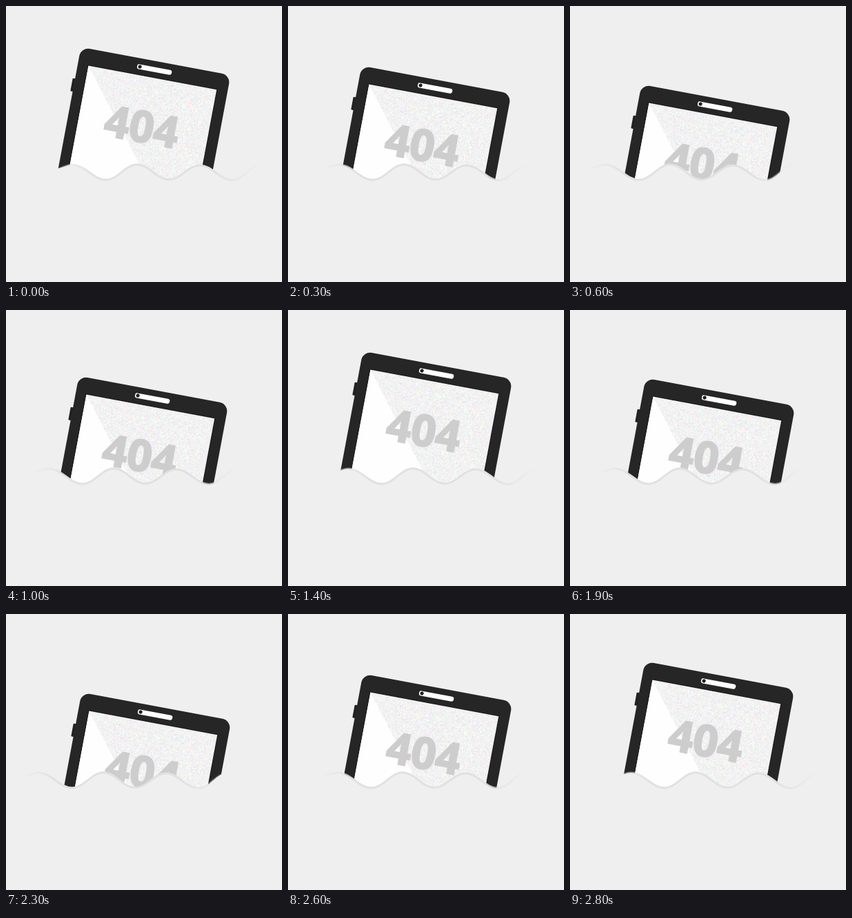
Write an HTML page with a canvas that moves like this. It is 400 by 400 pixels and loops after 2900 ms.

```html
<!DOCTYPE html>
<html lang="en">
<head>
<meta charset="utf-8">
<title>404</title>
<style>
  html, body { margin: 0; width: 100%; height: 100%; overflow: hidden; background: #efefef; }
  canvas { display: block; width: 400px; height: 400px; }
</style>
</head>
<body>
<canvas id="stage" width="400" height="400"></canvas>
<script>
const ctx = document.getElementById('stage').getContext('2d');
const LOOP = 2900, STEP = 100;
const BACKGROUND = '#efefef';
const TILT = 10.6 * Math.PI / 180;
const SCREEN = { w: 189, h: 210 };

// Each key: time, then the offsets at that time
const tabletKeys = [[0, 0, 0], [700, -5.8, 63], [1400, 0, 0], [2200, 1, 63], [2900, 0, 0]];
const waveKeys = [[0, 0], [700, -52], [1400, -9], [2300, -49], [2900, 0]];

// Alternating crests and troughs of the water line
const wave = [[70, 236], [96, 230], [145, 252], [190, 229.7], [236, 251.7],
  [281, 231], [328, 252.5], [370, 230]];

// Layers sit on whole pixels
function offsetsAt(keys, time) {
  const next = keys.findIndex(key => key[0] > time);
  const from = keys[next - 1], to = keys[next];
  const k = (time - from[0]) / (to[0] - from[0]);
  return from.map((value, i) => Math.round(value + (to[i] - value) * k)).slice(1);
}

function makeNoise() {
  const tile = document.createElement('canvas');
  tile.width = SCREEN.w;
  tile.height = SCREEN.h;
  const tileCtx = tile.getContext('2d');
  const image = tileCtx.createImageData(tile.width, tile.height);
  let seed = 404;
  for (let i = 0; i < image.data.length; i++) {
    seed = (Math.imul(seed, 1664525) + 1013904223) >>> 0;
    image.data[i] = i % 4 === 3 ? 255 : 221 + 44 * seed / 4294967296;
  }
  tileCtx.putImageData(image, 0, 0);
  return tile;
}
const noise = makeNoise();

function roundBox(x, y, w, h, r, color) {
  ctx.beginPath();
  ctx.roundRect(x, y, w, h, r);
  ctx.fillStyle = color;
  ctx.fill();
}

function drawTablet(x, y) {
  ctx.save();
  ctx.translate(119.5 + x, 86.5 + y);
  ctx.rotate(TILT);

  roundBox(-19, 22, 8, 19, 1, '#222');
  roundBox(-15.6, -24.5, 220.6, 290, 13, '#262626');
  roundBox(69.5, -15.7, 51, 7.2, 3, '#fff');
  ctx.beginPath();
  ctx.arc(73.6, -12.2, 2.6, 0, Math.PI * 2);
  ctx.fillStyle = '#222';
  ctx.fill();

  roundBox(-1, -1, SCREEN.w + 2, SCREEN.h, 0, '#171717');
  ctx.drawImage(noise, 0, 0);
  ctx.beginPath();
  ctx.moveTo(0, 0);
  ctx.lineTo(SCREEN.h * 0.78, SCREEN.h);
  ctx.lineTo(0, SCREEN.h);
  ctx.fillStyle = '#fefefe';
  ctx.fill();

  ctx.font = '700 63px "Open Sans", sans-serif';
  ctx.textAlign = 'center';
  ctx.fillStyle = ctx.strokeStyle = '#cecdce';
  ctx.lineWidth = 2.2;
  ctx.fillText('404', 92.3, 95);
  ctx.strokeText('404', 92.3, 95);
  ctx.restore();
}

function traceWave() {
  ctx.beginPath();
  ctx.moveTo(...wave[0]);
  for (let i = 1; i < wave.length; i++) {
    const [x0, y0] = wave[i - 1], [x1, y1] = wave[i];
    const bend = (x1 - x0) * 0.38;
    ctx.bezierCurveTo(x0 + bend, y0, x1 - bend, y1, x1, y1);
  }
}

function drawWater(x) {
  ctx.save();
  ctx.translate(x, 0);
  traceWave();
  ctx.lineTo(500, 230);
  ctx.lineTo(500, 400);
  ctx.lineTo(-50, 400);
  ctx.lineTo(-50, 236);
  ctx.fillStyle = BACKGROUND;
  ctx.fill();

  const fade = ctx.createLinearGradient(70, 0, 370, 0);
  fade.addColorStop(0, 'rgba(225,225,225,0)');
  fade.addColorStop(0.17, 'rgb(225,225,225)');
  fade.addColorStop(0.78, 'rgb(225,225,225)');
  fade.addColorStop(1, 'rgba(225,225,225,0)');
  traceWave();
  ctx.strokeStyle = fade;
  ctx.lineWidth = 3;
  ctx.stroke();
  ctx.restore();
}

function render(now) {
  const time = Math.floor((now % LOOP) / STEP) * STEP;
  ctx.fillStyle = BACKGROUND;
  ctx.fillRect(0, 0, 400, 400);
  drawTablet(...offsetsAt(tabletKeys, time));
  drawWater(...offsetsAt(waveKeys, time));
}

const start = performance.now();
function tick() {
  render(performance.now() - start);
  requestAnimationFrame(tick);
}
tick();
</script>
</body>
</html>
```
